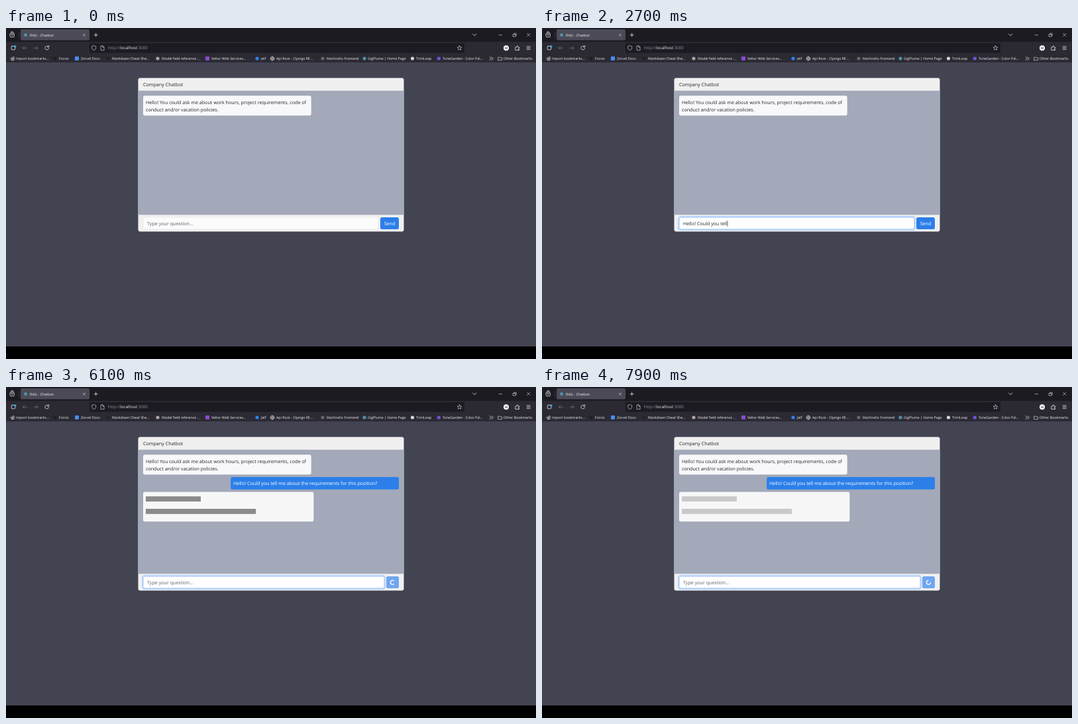
Recreate the animation shown at these times as an HTML page. Size 800 by 500 pixels, loop 8 s.

```html
<!DOCTYPE html>
<html lang="en">
<head>
<meta charset="utf-8">
<title>Company Chatbot</title>
<style>
html, body { margin: 0; height: 100%; overflow: hidden; background: #424452; }
svg { display: block; width: 800px; height: 500px; }
text {
  font-family: "Open Sans", "Noto Sans", sans-serif;
  text-rendering: geometricPrecision;
  white-space: pre;
}
.chat { font-size: 7.15px; fill: #212529; }
.ui { font-size: 5.27px; fill: #f3f3f6; }
.line { fill: none; stroke: #e6e6ea; stroke-width: .8; stroke-linecap: round; stroke-linejoin: round; }
.dim { stroke: #75747e; }
.thin { stroke-width: .6; }
.white { fill: #fff; }
.hint { fill: #5b5f64; }
</style>
</head>
<body>
<svg viewBox="0 0 800 500">
  <!-- Tab strip -->
  <rect width="800" height="21" fill="#1c1b22"/>
  <rect x="22" y="2" width="104" height="16.5" rx="2" fill="#4b4a56"/>
  <circle cx="29.5" cy="10.5" r="2.5" fill="#4d91a8"/>
  <text class="ui" x="36" y="12.5" style="font-size:5.5px">RAG - Chatbot</text>
  <g class="line">
    <path d="M6.2 9h6.2v3.7q0 1-1 1H7.2q-1 0-1-1zM6.8 7.2h5M8 5.8h2.6M8.2 11h2.2"/>
    <path class="thin" d="M116.4 9l3.2 3.2m0-3.2l-3.2 3.2"/>
    <path d="M133.2 10.5h5m-2.5-2.5v5"/>
    <path d="M704.5 9l2.7 2.7 2.7-2.7"/>
    <path class="thin" d="M744 10.7h4.4M765.4 9.5h3.5v3.5h-3.5zM766.7 9.3V8.2h3.5v3.5H769M786.6 8.3l4.2 4.2m0-4.2l-4.2 4.2"/>
  </g>
  <path d="M19.5 6v9" stroke="#4b4a56" stroke-width=".6"/>

  <!-- Toolbar -->
  <rect y="21" width="800" height="31" fill="#2b2a33"/>
  <rect x="126" y="23" width="566" height="14.5" rx="2" fill="#1c1b22"/>
  <g class="line">
    <rect x="8.2" y="27.4" width="5.6" height="5.4" rx="1"/>
    <path class="dim" d="M31.5 30.2h-6m2.4-2.4l-2.4 2.4 2.4 2.4M42 30.2h6m-2.4-2.4l2.4 2.4-2.4 2.4"/>
    <path d="M64 28.1a2.9 2.9 0 1 0 .7 2.5M64.7 26.7v2.2h-2.2"/>
    <path class="thin" d="M132.7 26.8l3 1v2.3q0 2.5-3 3.7-3-1.2-3-3.7v-2.3z"/>
    <path class="thin" d="M143.5 27h2.6l2 2v4.6h-4.6zM146 27v2.1h2"/>
    <path class="thin" d="M684.6 26.7l1 2.2 2.4.3-1.8 1.6.5 2.4-2.1-1.2-2.1 1.2.5-2.4-1.8-1.6 2.4-.3z"/>
    <path d="M769.2 29h1.6q-.4-2 1-2t1 2h1.9v1.7q-1.6-.3-1.6 .7t1.6.8v1.3h-5.5z"/>
    <path d="M786.2 28h5m-5 2.2h5m-5 2.2h5"/>
  </g>
  <circle cx="13.7" cy="28" r="1.8" fill="#35a7ee"/>
  <circle cx="755" cy="30.2" r="4" fill="#fafafc"/>
  <text x="755" y="32" text-anchor="middle" font-size="4.6" font-weight="600" fill="#2b2a33">M</text>
  <text class="ui" x="154" y="32.4" style="font-size:6.2px;fill:#93929c">http://<tspan fill="#f3f3f6">localhost</tspan>:3000</text>

  <!-- Bookmarks -->
  <g id="marks"></g>
  <g class="line">
    <path d="M10.8 43.8h1.2v4.8H8.4v-1.4M6.8 46h3.8m-1.4-1.4l1.4 1.4-1.4 1.4"/>
    <circle class="thin" cx="402" cy="46.2" r="2.9"/>
    <path class="thin" d="M399.2 46.2h5.6M402 43.3q-2.6 2.9 0 5.8 2.6-2.9 0-5.8"/>
    <path d="M730.2 43.8l2.3 2.3-2.3 2.3m2.9-4.6l2.3 2.3-2.3 2.3"/>
    <path class="thin" d="M743 44.2h2l.8.8h2.8v3.7H743z"/>
  </g>

  <!-- Page -->
  <rect y="52" width="800" height="429" fill="#424452"/>
  <rect y="481" width="800" height="19"/>

  <!-- Chat card -->
  <rect x="199.5" y="75.5" width="401" height="232" rx="3" fill="#f0f0f1"/>
  <rect x="199.5" y="94.7" width="401" height="187.5" fill="#a3a9b9"/>
  <text class="chat" x="207" y="88.1">Company Chatbot</text>
  <rect x="207" y="102.2" width="253.7" height="30" rx="2.5" fill="#f8f8fa"/>
  <text class="chat" x="211" y="114.6">Hello! You could ask me about work hours, project requirements, code of</text>
  <text class="chat" x="211" y="126.1">conduct and/or vacation policies.</text>

  <g id="reply">
    <rect x="339.2" y="136" width="253.8" height="18.8" rx="2.5" fill="#2c7fe9"/>
    <text class="chat white" id="sent" x="343" y="148.3"></text>
    <rect x="207" y="158.5" width="257.4" height="44.8" rx="2.5" fill="#f7f7f8"/>
    <g id="bars" fill="#212121">
      <rect x="211" y="165.2" width="83" height="7.8"/>
      <rect x="211" y="184" width="166.2" height="7.8"/>
    </g>
  </g>

  <rect id="ring" x="206" y="285" height="20" rx="3.4" fill="none" stroke="#bcd5fa" stroke-width="2"/>
  <rect id="field" x="207.2" y="286.2" height="17.6" rx="2.4" stroke-width=".6"/>
  <text class="chat" id="typed" x="213" y="298.2"></text>
  <rect id="caret" y="290.7" width=".6" height="9.2" fill="#111"/>

  <g id="send">
    <rect x="565" y="286" width="28" height="18" rx="2.5" fill="#2c7fe9"/>
    <text class="chat white" x="579" y="298.2" text-anchor="middle">Send</text>
  </g>
  <g id="busy">
    <rect x="574" y="286" width="19" height="18" rx="2.5" fill="#70a6f0"/>
    <path id="spin" d="M2.19 2.19A3.1 3.1 0 1 1 2.19-2.19" fill="none" stroke="#fff" stroke-width="1.4"/>
  </g>
</svg>
<script>
const $ = id => document.getElementById(id);
const LOOP = 8000, STEP = 100;
const FOCUS = 400, SENT = 6100, GLOW = 1240, SPIN = 465;
const QUESTION = 'Hello! Could you tell me about the requirements for this position?';

// Typing pace: time, characters on screen
const PACE = [[800, 0], [900, 1], [1500, 5], [1800, 7], [2700, 21], [3600, 34], [3700, 34],
  [3800, 35], [3900, 35], [4000, 36], [4800, 47], [5000, 50], [5700, 64], [5900, 66]];

// Bookmarks: label, text x, icon x, icon colour
const MARKS = [
  ['Import bookmarks...', 15],
  ['Forvix', 80, 74, '#1f1e26'],
  ['Zorvel Docs', 113, 107, '#4a8cf5', 'square'],
  ['Markdown Cheat She...', 160, 153.5, '#232229'],
  ['Model field reference ...', 235, 229, '#a9a6a4'],
  ['Veltor Web Services...', 310, 304, '#8a4bd0', 'square'],
  ['Jelf', 385, 379, '#2f83f5'],
  ['Api Root – Django RE...', 408],
  ['MarlinvKo Frontend', 484, 478, '#66656c'],
  ['GigPlume | Home Page', 546, 541, '#4d91a8'],
  ['TrimLoop', 619, 613.5, '#d5d5dc'],
  ['ToneGarden - Color Pal...', 659, 653.3, '#7156e0'],
  ['Other Bookmarks', 751]
];

$('marks').innerHTML = MARKS.map(([label, x, ix, color, shape]) => {
  const icon = !color ? '' : shape
    ? `<rect x="${ix - 3}" y="43" width="6" height="6" rx=".8" fill="${color}"/>`
    : `<circle cx="${ix}" cy="46" r="2.6" fill="${color}"/>`;
  return `${icon}<text class="ui" x="${x}" y="47.9">${label}</text>`;
}).join('');
$('sent').textContent = QUESTION;

function typedCount(t) {
  if (t <= PACE[0][0]) return 0;
  const i = PACE.findIndex(p => p[0] >= t);
  if (i < 0) return QUESTION.length;
  const [t0, n0] = PACE[i - 1], [t1, n1] = PACE[i];
  return Math.floor(n0 + (n1 - n0) * (t - t0) / (t1 - t0) + 1e-6);
}

const show = (id, on) => $(id).setAttribute('visibility', on ? 'visible' : 'hidden');

function draw(t) {
  const sent = t >= SENT;
  const count = sent ? 0 : typedCount(t);
  const focus = Math.min(1, Math.max(0, (t - FOCUS + STEP) / (2 * STEP)));
  const width = sent ? 363.6 : 354.6;

  show('reply', sent);
  show('busy', sent);
  show('send', !sent);

  $('field').setAttribute('width', width);
  $('field').setAttribute('fill', focus ? '#fff' : '#fbfbfc');
  $('field').setAttribute('stroke', focus ? '#8fbafa' : '#ececef');
  $('ring').setAttribute('width', width + 2.4);
  $('ring').setAttribute('opacity', focus);

  const typed = $('typed');
  typed.textContent = count ? QUESTION.slice(0, count) : 'Type your question...';
  typed.setAttribute('class', count ? 'chat' : 'chat hint');
  $('caret').setAttribute('x', 213.2 + (count ? typed.getComputedTextLength() : -.4));
  show('caret', !sent && (count > 0 || t >= FOCUS && t < FOCUS + 300));

  const age = t - SENT;
  $('bars').setAttribute('opacity', .35 + .15 * Math.cos(2 * Math.PI * age / GLOW));
  $('spin').setAttribute('transform', `translate(583.5 295.2) rotate(${360 * age / SPIN})`);
}

const start = performance.now();
let last = -1;
function tick() {
  const t = Math.floor((performance.now() - start) % LOOP / STEP) * STEP;
  if (t !== last) draw(last = t);
  requestAnimationFrame(tick);
}
tick();
</script>
</body>
</html>
```
